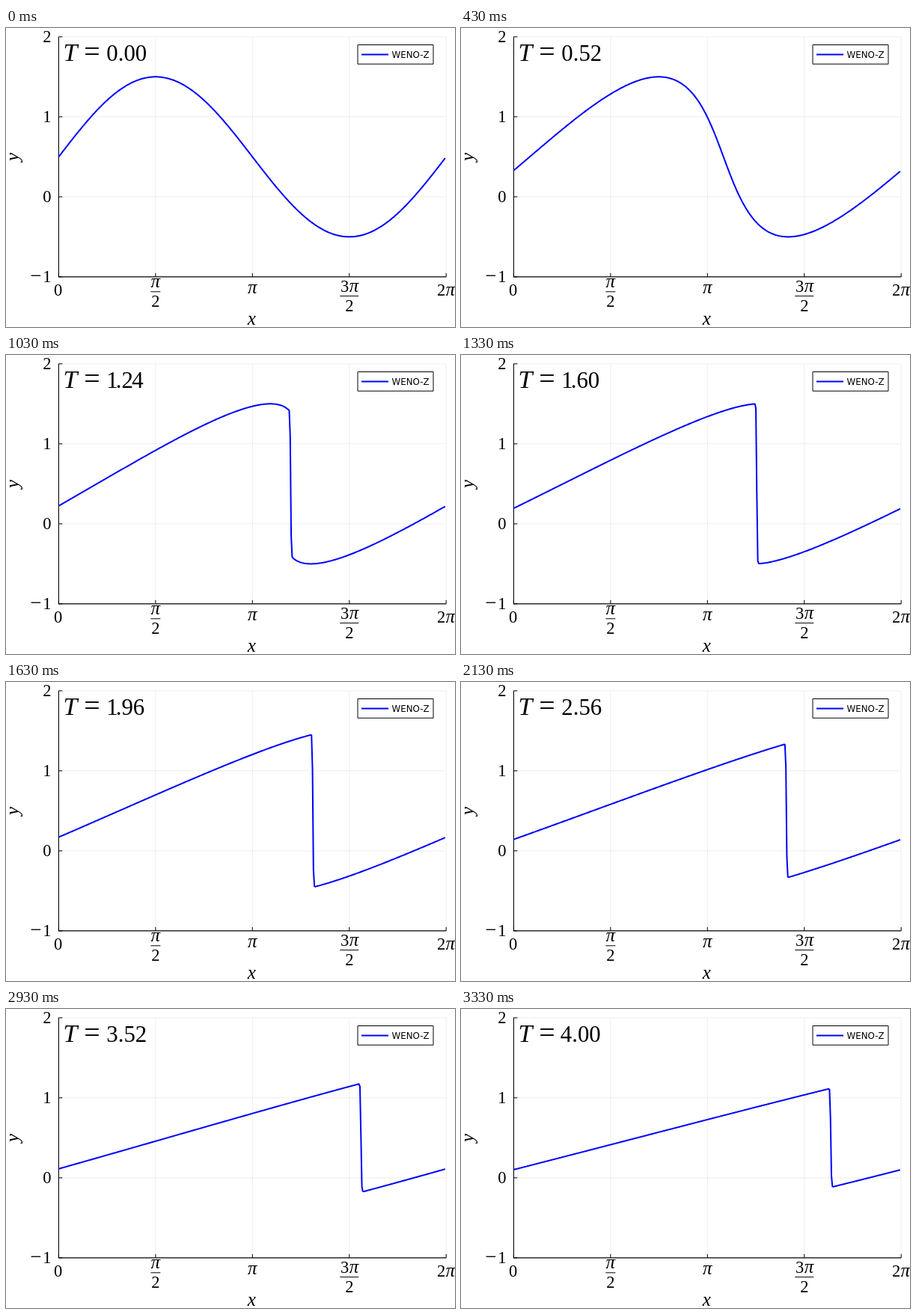
An HTML page with a canvas for the animation above (3360 ms loop, 600 px wide and 400 px high).

```html
<!DOCTYPE html>
<html lang="en">
<head>
<meta charset="utf-8">
<style>
  html, body { margin: 0; width: 100%; height: 100%; overflow: hidden; background: #fff; }
  canvas { display: block; }
</style>
</head>
<body>
<canvas id="stage" width="600" height="400"></canvas>
<script>
const ctx = document.getElementById('stage').getContext('2d');
const LOOP = 3360, FRAMES = 101, DT_FRAME = 0.04, SUBSTEPS = 8;
const N = 400, DX = 2 * Math.PI / N, SPEED = 1.5;
const LEFT = 70.4, RIGHT = 588.2, TOP = 11.8, BOTTOM = 332.9;
const SERIF = '"Liberation Serif", serif';

const px = x => LEFT + x / (2 * Math.PI) * (RIGHT - LEFT);
const py = y => BOTTOM - (y + 1) / 3 * (BOTTOM - TOP);

// Fifth-order WENO-Z reconstruction at the interface right of c.
function weno(a, b, c, d, e) {
  const smooth = (curve, slope) => 13 / 12 * curve * curve + slope * slope / 4;
  const b0 = smooth(a - 2 * b + c, a - 4 * b + 3 * c);
  const b1 = smooth(b - 2 * c + d, b - d);
  const b2 = smooth(c - 2 * d + e, 3 * c - 4 * d + e);
  const tau = Math.abs(b0 - b2), eps = 1e-40;
  const w0 = 0.1 * (1 + tau / (b0 + eps));
  const w1 = 0.6 * (1 + tau / (b1 + eps));
  const w2 = 0.3 * (1 + tau / (b2 + eps));
  return (w0 * (2 * a - 7 * b + 11 * c) + w1 * (-b + 5 * c + 2 * d)
    + w2 * (2 * c + 5 * d - e)) / (6 * (w0 + w1 + w2));
}

// Burgers' equation, Lax-Friedrichs splitting, periodic domain.
function rate(u) {
  const plus = u.map(v => (v * v / 2 + SPEED * v) / 2);
  const minus = u.map(v => (v * v / 2 - SPEED * v) / 2);
  const at = (f, i) => f[(i + N) % N];
  const flux = u.map((_, i) =>
    weno(at(plus, i - 2), at(plus, i - 1), plus[i], at(plus, i + 1), at(plus, i + 2)) +
    weno(at(minus, i + 3), at(minus, i + 2), at(minus, i + 1), minus[i], at(minus, i - 1)));
  return flux.map((f, i) => (at(flux, i - 1) - f) / DX);
}

// Third-order strong-stability-preserving Runge-Kutta step.
function step(u, dt) {
  const stage = (v, keep) => {
    const r = rate(v);
    return u.map((u0, i) => keep * u0 + (1 - keep) * (v[i] + dt * r[i]));
  };
  return stage(stage(stage(u, 0), 3 / 4), 1 / 3);
}

function solve() {
  let u = Float64Array.from({ length: N }, (_, i) => 0.5 + Math.sin(i * DX));
  const states = [u];
  while (states.length < FRAMES) {
    for (let s = 0; s < SUBSTEPS; s++) u = step(u, DT_FRAME / SUBSTEPS);
    states.push(u);
  }
  return states;
}

function line(points, color, width) {
  ctx.strokeStyle = color;
  ctx.lineWidth = width;
  ctx.lineJoin = 'round';
  ctx.beginPath();
  for (const [x, y] of points) ctx.lineTo(x, y);
  ctx.stroke();
}

function text(str, x, y, size, { align = 'center', italic = false, family = SERIF } = {}) {
  ctx.font = `${italic ? 'italic ' : ''}${size}px ${family}`;
  ctx.textAlign = align;
  ctx.fillStyle = '#000';
  ctx.fillText(str, x, y);
}

const pi = (x, y) => text('π', x, y, 25, { italic: true });

function halfFraction(x, barY, halfWidth) {
  line([[x - halfWidth, barY], [x + halfWidth, barY]], '#000', 1);
  text('2', x, barY + 20.5, 22.5);
}

function drawAxes() {
  for (let i = 0; i <= 4; i++) {
    const x = px(i * Math.PI / 2);
    if (i) line([[x, TOP], [x, BOTTOM]], 'rgba(0,0,0,0.1)', 0.7);
    line([[x, BOTTOM], [x, BOTTOM - 5]], '#000', 1);
  }
  for (let v = -1; v <= 2; v++) {
    const y = py(v);
    if (v > -1) line([[LEFT, y], [RIGHT, y]], 'rgba(0,0,0,0.1)', 0.7);
    line([[LEFT, y], [LEFT + 5, y]], '#000', 1);
    text(String(Math.abs(v)), 60.5, y + 7.4, 22.5, { align: 'right' });
  }
  text('−', 39.8, 340, 27);
  line([[LEFT, TOP], [LEFT, BOTTOM], [RIGHT, BOTTOM]], '#000', 1.1);

  text('0', 69.6, 357.5, 22.5);
  pi(px(Math.PI / 2), 347);
  halfFraction(px(Math.PI / 2), 352.8, 6.5);
  pi(px(Math.PI), 355.3);
  text('3', 452.5, 353, 22.5);
  pi(465, 353);
  halfFraction(px(1.5 * Math.PI), 358.6, 12.5);
  text('2', 581.5, 357.5, 22.5);
  pi(593.7, 357.5);

  text('x', 328.3, 397.3, 25, { italic: true });
  ctx.save();
  ctx.translate(17, 172.5);
  ctx.rotate(-Math.PI / 2);
  text('y', 0, 0, 25, { italic: true });
  ctx.restore();
}

function drawTitle(time) {
  const size = 30.8, baseline = 43.5;
  text('T', 76.5, baseline, 34, { align: 'left', italic: true });
  text('=', 115, 44.3, 38);
  let x = 134.3;
  for (const ch of time.toFixed(2)) {
    if (ch === '4') x -= 1.5;
    text(ch, x, baseline, size, { align: 'left' });
    x += ctx.measureText(ch).width - (ch === '1' ? 3 : 0);
  }
}

function drawLegend() {
  ctx.fillStyle = '#fff';
  ctx.fillRect(470, 22.5, 101, 25.7);
  ctx.strokeStyle = '#000';
  ctx.lineWidth = 1;
  ctx.strokeRect(470, 22.5, 101, 25.7);
  line([[475, 35.4], [511, 35.4]], '#00f', 2);
  text('WENO-Z', 515.6, 39.6, 11.8, { align: 'left', family: '"DejaVu Sans", sans-serif' });
}

const states = solve();

function render(now) {
  // Frames last 100/3 ms, with start times rounded to 10 ms.
  const tick = Math.floor((now % LOOP) / 10);
  const frame = Math.min(FRAMES - 1, Math.floor((tick + 0.5) * 0.3));
  ctx.fillStyle = '#fff';
  ctx.fillRect(0, 0, 600, 400);
  drawAxes();
  line(Array.from(states[frame], (u, i) => [px(i * DX), py(u)]), '#00f', 2);
  drawTitle(frame * DT_FRAME);
  drawLegend();
}

const start = performance.now();
function loop() {
  render(performance.now() - start);
  requestAnimationFrame(loop);
}
loop();
</script>
</body>
</html>
```
